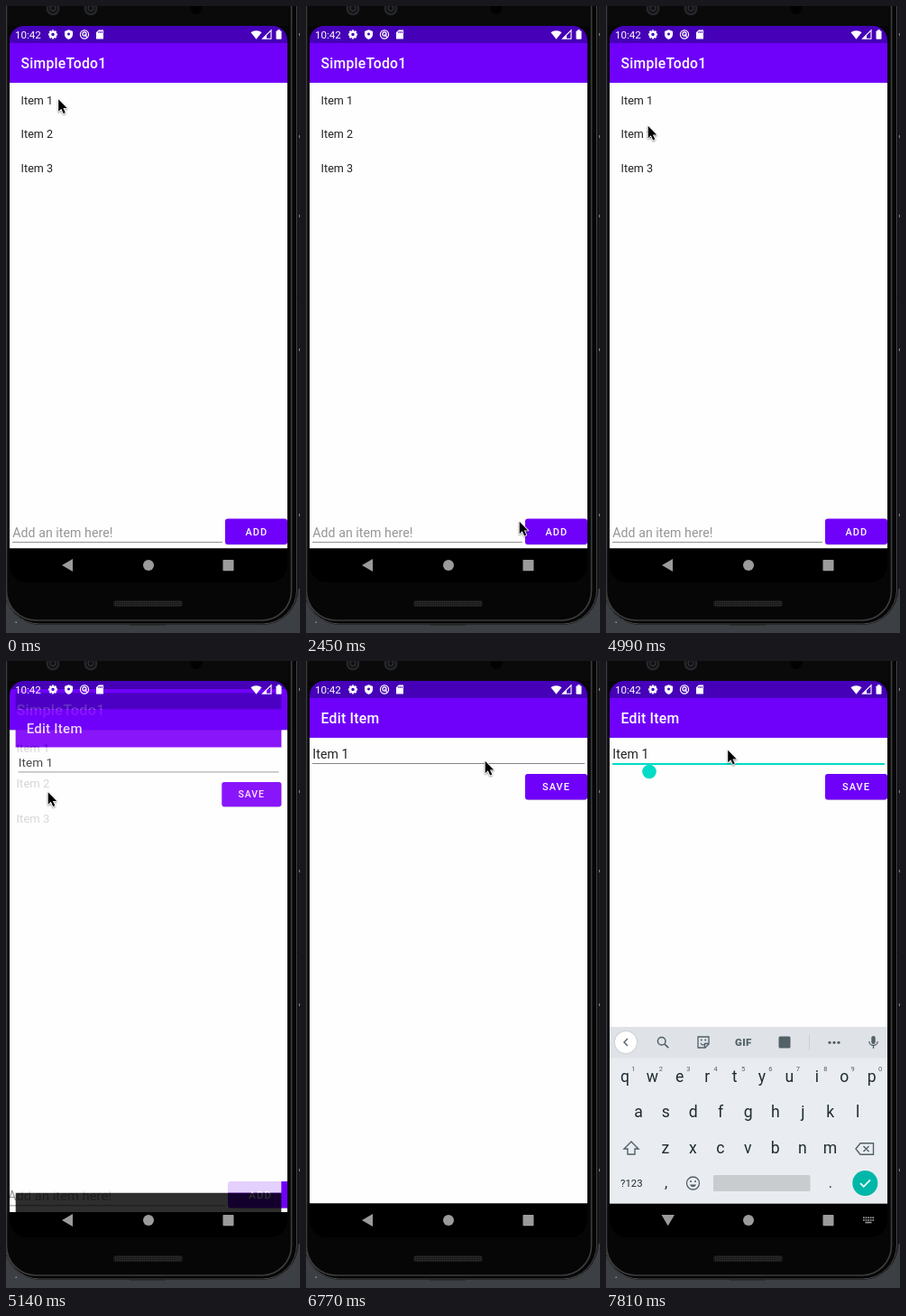
Recreate the animation shown at these times as an HTML page with a canvas. Size 326 by 694 pixels, loop 8 s.

```html
<!DOCTYPE html>
<html lang="en">
<head>
<meta charset="utf-8">
<title>Todo app on a phone</title>
<style>
  html, body { margin: 0; width: 100%; height: 100%; overflow: hidden; background: #000; }
  canvas { display: block; width: 326px; height: 694px; }
</style>
</head>
<body>
<canvas id="stage"></canvas>
<script>
const W = 326, H = 694, LOOP = 8000;
const PURPLE = '#6f00fa', DARK = '#4500b8', WHITE = '#fefefe', TEAL = '#00dcc6', NAV = '#9b9b9b';
const ratio = window.devicePixelRatio || 1;
const canvas = document.getElementById('stage');
const layer = document.createElement('canvas');
for (const c of [canvas, layer]) { c.width = W * ratio; c.height = H * ratio; }
const main = canvas.getContext('2d'), side = layer.getContext('2d');
let g = main;

// Pointer tip: time, x, y
const POINTER = [
  [0, 57.5, 102.5], [500, 46, 105], [650, 34, 105.5],
  [1250, 37, 102], [1400, 68, 116], [1550, 115, 138], [1700, 143, 152],
  [2150, 165, 235], [2300, 212, 430], [2450, 236, 570], [2600, 237, 592],
  [2750, 195, 400], [2900, 105, 180], [3050, 57, 85],
  [3340, 52, 95], [3490, 45, 102], [3790, 45.5, 100.5],
  [4840, 46, 112], [4990, 46, 132], [5140, 46, 144.5],
  [5880, 58.5, 140.5], [6030, 125, 150], [6180, 218, 161], [6330, 244, 134],
  [6620, 228, 125], [6770, 198, 110], [6920, 172, 100], [7070, 152, 95],
  [7210, 144, 93.5], [7360, 142.5, 93], [7810, 134.5, 98]
];

function rect(x, y, w, h, color) { g.fillStyle = color; g.fillRect(x, y, w, h); }

function round(x, y, w, h, r, color) {
  g.beginPath(); g.roundRect(x, y, w, h, r);
  g.fillStyle = color; g.fill();
}

function ring(x, y, w, h, r, color, width = 1) {
  g.beginPath(); g.roundRect(x, y, w, h, r);
  g.strokeStyle = color; g.lineWidth = width; g.stroke();
}

function dot(x, y, r, color) {
  g.beginPath(); g.arc(x, y, r, 0, Math.PI * 2);
  g.fillStyle = color; g.fill();
}

function hoop(x, y, r, color, width = 1.3) {
  g.beginPath(); g.arc(x, y, r, 0, Math.PI * 2);
  g.strokeStyle = color; g.lineWidth = width; g.stroke();
}

function path(d, x, y, fill, stroke, width = 1.4) {
  const p = new Path2D(d);
  g.save();
  g.translate(x, y);
  if (fill) { g.fillStyle = fill; g.fill(p); }
  if (stroke) { g.strokeStyle = stroke; g.lineWidth = width; g.stroke(p); }
  g.restore();
}

function text(s, x, y, size, color, { weight = 400, align = 'left', space = 0.06 } = {}) {
  g.font = `${weight} ${size}px Roboto, sans-serif`;
  g.letterSpacing = space + 'px';
  g.textAlign = align;
  g.fillStyle = color;
  g.fillText(s, x, y);
}

function button(label, y, x) {
  g.save();
  g.shadowColor = 'rgba(0,0,0,.2)';
  g.shadowBlur = ratio;
  g.shadowOffsetY = ratio / 2;
  round(243, y, 69, 28.5, 3, PURPLE);
  g.restore();
  text(label, x, y + 18.3, 11, '#fff', { weight: 500, space: 1 });
}

function windowBase(title) {
  rect(4, 22, 308, 19, DARK);
  rect(4, 41, 308, 44, PURPLE);
  rect(4, 85, 308, 515.5, WHITE);
  rect(4, 600.5, 308, 37.5, '#000');
  text(title, 16.5, 69, 15.7, '#fff', { weight: 500, space: 0.27 });
}

function listWindow() {
  windowBase('SimpleTodo1');
  for (let i = 0; i < 3; i++) text('Item ' + (i + 1), 16.5, 108.5 + i * 37.7, 12.57, '#222');
  text('Add an item here!', 7.3, 588, 14.14, '#959595');
  rect(7, 593, 233, 1, '#929292');
  button('ADD', 567.5, 265.5);
}

function editWindow(focus, caret) {
  windowBase('Edit Item');
  text('Item 1', 7.3, 107.5, 14.14, '#222');
  button('SAVE', 125, 262);
  if (!focus) { rect(7, 113, 302, 1, '#858585'); return; }
  rect(7, 113, 302, 2, TEAL);
  if (caret) rect(47, 93, 1.7, 20, TEAL);
  dot(48, 122.5, 7.8, TEAL);
  path('M0 0L5.6 5.6H-5.6Z', 48, 113.5, TEAL);
}

function scaled(s, draw) {
  g.save();
  g.translate(158, 330);
  g.scale(s, s);
  g.translate(-158, -330);
  draw();
  g.restore();
}

// Keeps purple areas saturated while they fade in over white.
function tint() {
  g.globalCompositeOperation = 'multiply';
  rect(4, 41, 308, 44, '#ff7aff');
  round(243, 125, 69, 28.5, 3, '#ff7aff');
}

// The edit window grows and fades in while the list grows behind it.
function openWindow(p, alpha) {
  const s = 0.85 + 0.15 * p;
  scaled(1 + 0.05 * p, listWindow);
  scaled(s, tint);
  useLayer();
  scaled(s, () => editWindow(false));
  blend(alpha);
}

function useLayer() {
  g = side;
  g.setTransform(ratio, 0, 0, ratio, 0, 0);
  g.clearRect(0, 0, W, H);
}

function blend(alpha) {
  g = main;
  g.globalAlpha = alpha;
  g.drawImage(layer, 0, 0, W, H);
  g.globalAlpha = 1;
}

function statusIcons() {
  const c = '#fff';
  text('10:42', 10, 35.7, 11.6, c, { space: 0 });
  for (let i = 0; i < 8; i++) {
    g.save();
    g.translate(52, 31.5);
    g.rotate(i * Math.PI / 4);
    rect(-1.2, -5, 2.4, 2.5, c);
    g.restore();
  }
  hoop(52, 31.5, 2.8, c, 2.1);
  path('M0 -5.3L4.5 -3.5V0C4.5 3 2.5 4.7 0 5.5C-2.5 4.7 -4.5 3 -4.5 0V-3.5Z', 69.5, 31.5, c);
  dot(69.5, 31, 1.5, DARK);
  hoop(87, 31.5, 4.6, c, 1.2);
  hoop(87, 31, 2.1, c, 1.2);
  path('M0 0L3 3.2', 87, 31.5, null, c, 1.2);
  path('M-1.2 -5H4V5H-4V-2.2Z', 104, 31.5, c);
  for (let i = 0; i < 3; i++) rect(102.4 + i * 1.8, 28, 0.9, 2, DARK);
  path('M0 5L-6 -2.6C-3 -5.3 3 -5.3 6 -2.6Z', 277.5, 31.8, c);
  path('M4.5 -5V4.5H-5Z', 289.5, 31.8, null, c, 1.1);
  path('M-5 4.5L-.5 0V4.5Z', 289.5, 31.8, c);
  round(299.5, 27.5, 6, 9.3, 0.8, c);
  rect(301, 26.3, 3, 1.5, c);
}

function navIcons(state) {
  const back = ['M-6 0L6 -7V7Z', 'M-5 -8L7.5 -1.5L-5 5Z', 'M-7 -6H7.5L.2 6.3Z'][state];
  path(back, [68, 70, 68.5][state], 619, NAV);
  dot(158, 619, 6, NAV);
  round(240.5, 613, 12, 12.3, 0.7, NAV);
  if (!state) return;
  for (let r = 0; r < 2; r++)
    for (let i = 0; i < 5; i++) rect(285 + i * 2.6, 615.3 + r * 2.7, 1.7, 1.7, NAV);
  rect(287.5, 620.7, 7, 1.6, NAV);
}

function keyboard() {
  const ink = '#1f2b31', soft = '#526068';
  rect(4, 405, 308, 195.5, '#e9edf1');
  rect(4, 405, 308, 34.5, '#dfe3e7');
  g.save();
  g.shadowColor = 'rgba(0,0,0,.25)';
  g.shadowBlur = 2 * ratio;
  dot(22, 422, 12, '#fff');
  g.restore();
  path('M2 -4L-2 0L2 4', 22, 422, null, soft);
  hoop(61.7, 420.7, 4.3, soft, 1.5);
  path('M3.2 3.2L7.5 7.5', 61.7, 420.7, null, soft, 1.7);
  path('M-6 -6H6V2L2 6H-6ZM6 1.5H1.5V6M-3 1C-2 3 0 3.3 1 2.6', 108, 422, null, soft, 1.3);
  dot(105.8, 419.6, 1, soft);
  dot(110.2, 419.6, 1, soft);
  text('GIF', 152.3, 426.2, 11.5, soft, { weight: 900, align: 'center', space: 0.4 });
  round(191.5, 415.5, 13, 13, 1.5, soft);
  rect(225, 414, 1, 17, '#cbd0d5');
  for (let i = -1; i < 2; i++) dot(253 + i * 5, 422.3, 1.6, soft);
  round(294.3, 415, 4.4, 9, 2.2, soft);
  path('M-4.7 -1C-4.7 5 4.7 5 4.7 -1M0 3.5V7', 296.5, 422, null, soft, 1.3);

  const rows = [['qwertyuiop', 21, 465.5], ['asdfghjkl', 36, 504.5], ['zxcvbnm', 66, 544.5]];
  for (const [keys, x, y] of rows)
    [...keys].forEach((k, i) => text(k, x + i * 30.4, y, 17.6, ink, { align: 'center' }));
  for (let i = 0; i < 10; i++)
    text((i + 1) % 10, 30.5 + i * 30.4, 453.5, 7.5, soft, { align: 'center' });

  path('M0 -8L8 0H4V6H-4V0H-8Z', 28, 540, null, soft);
  path('M-10 0L-5 -6.3H9.5V6.3H-5ZM-1.5 -3L4.5 3M4.5 -3L-1.5 3', 287, 540, null, soft);
  text('?123', 28.3, 582, 11.3, ink, { align: 'center' });
  text(',', 66.5, 583, 16, ink, { align: 'center' });
  hoop(96.5, 578, 7, soft);
  dot(94, 576, 1.1, soft);
  dot(99, 576, 1.1, soft);
  path('M-3.6 1.5C-2 5 2 5 3.6 1.5Z', 96.5, 578, soft);
  round(119, 569, 107.5, 18, 1.5, '#c9cccf');
  text('.', 249, 583, 16, ink, { align: 'center' });
  dot(287.3, 578, 14, '#00b7a8');
  path('M-5.3 0L-1.6 3.8L5.7 -3.6', 287.3, 578, null, '#fff', 1.7);
}

function phone() {
  rect(0, 0, W, H, '#3c3f43');
  rect(322, 0, 4, 645, '#1c1c1e');
  round(-2, -60, 326, 745, 40, '#060606');
  ring(-1, -60, 323.5, 744, 38, '#4b4b4d');
  ring(0.5, -60, 316, 740, 33, '#3d3d3f', 1.6);
  rect(2, 0, 312, 22, '#0a0a0b');
  for (const y of [30, 143, 231, 379, 562]) rect(324.8, y, 1.2, 3, '#77777a');
  for (const x of [52, 94]) {
    dot(x, 3, 7.5, '#252628');
    dot(x, 3, 5, '#101114');
    hoop(x, 2.5, 3, '#3b3d42', 1);
  }
  dot(211, 2.5, 6.5, '#020202');
  round(119, 658, 77, 7, 3, '#1a1a1a');
  for (let r = 0; r < 3; r++)
    for (let i = 0; i < 37; i++) rect(121 + i * 2, 659 + r * 2, 1, 1, '#333');
  rect(137, 684.5, 40, 1, '#202021');
  rect(10.5, 681.5, 1.3, 1.3, '#b5b5b5');
}

function pointer(t) {
  const [, x, y] = POINTER.findLast(k => k[0] <= t);
  g.save();
  g.lineJoin = 'round';
  g.shadowColor = 'rgba(0,0,0,.35)';
  g.shadowBlur = 2 * ratio;
  g.shadowOffsetY = ratio;
  const d = 'M.7 .7V14.2L3.8 11.3L6.2 16.6L8.3 15.6L5.9 10.5H10.2Z';
  path(d, x, y, '#fff', '#fff', 1.7);
  g.restore();
  path(d, x, y, '#000');
}

function screen(t) {
  if (t < 5140) listWindow();
  else if (t < 5290) openWindow(0.71, 0.82);
  else if (t < 5430) openWindow(0.95, 1);
  else editWindow(t >= 7510, t < 7810);

  if (t >= 7810) keyboard();
  else if (t >= 7660) {
    useLayer();
    g.translate(0, 5);
    keyboard();
    blend(0.9);
  }
  statusIcons();
  navIcons(t < 7510 ? 0 : t < 7660 ? 1 : 2);
}

function frame(now) {
  const t = now % LOOP;
  g = main;
  g.setTransform(ratio, 0, 0, ratio, 0, 0);
  phone();
  g.save();
  g.beginPath();
  g.roundRect(4, 22, 308, 616, [16, 16, 20, 20]);
  g.clip();
  rect(4, 22, 308, 616, '#000');
  screen(t);
  g.restore();
  pointer(t);
}

const start = performance.now();
function tick() {
  frame(performance.now() - start);
  requestAnimationFrame(tick);
}
tick();
</script>
</body>
</html>
```
